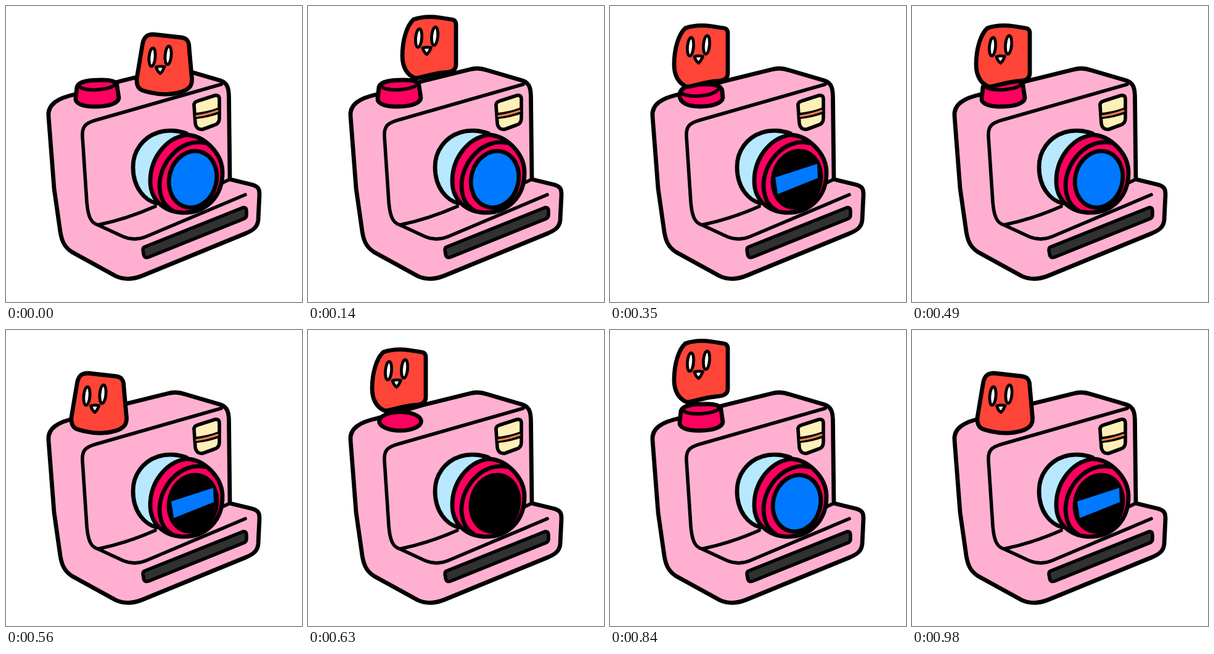
Recreate the animation shown at these times as an HTML page. Size 480 by 480 pixels, loop 1.05 s.

```html
<!DOCTYPE html>
<html lang="en">
<head>
<meta charset="utf-8">
<title>Bouncing on the shutter button</title>
<style>
html, body { margin: 0; width: 100%; height: 100%; overflow: hidden; background: #fff; }
svg { display: block; width: 100vw; height: 100vh; }
.ink { stroke: #000; stroke-width: 6.8; stroke-linecap: round; stroke-linejoin: round; fill: none; }
.pink { fill: #ffb0d0; }
.rose { fill: #ff0061; }
.red { fill: #ff4438; }
.sky { fill: #b8e8ff; }
.blue { fill: #0078ff; }
.cream { fill: #fff0b8; }
.dark { fill: #313131; }
.black { fill: #000; }
.thin { stroke-width: 5.6; }
.band { stroke-width: 10; stroke-linecap: butt; }
.stripe { stroke: #f0804f; stroke-width: 3; }

/* 15 poses of 70 ms each */
.hop, .crouch, .full, .half, .flat, .lids, .shut {
  animation: 1050ms step-end infinite;
}
.hop { animation-name: hopShow, hopMove; }
.crouch { animation-name: crouchShow, crouchMove; }
.full { animation-name: fullShow; }
.half { animation-name: halfShow; }
.flat { animation-name: flatShow; }
.lids { animation-name: lidsShow; }
.shut { animation-name: shutShow; }

@keyframes hopShow {
  0%, 20%, 53.33%, 93.33%, 100% { visibility: hidden; }
  6.66%, 26.66%, 60% { visibility: visible; }
}
@keyframes crouchShow {
  0%, 20%, 53.33%, 93.33%, 100% { visibility: visible; }
  6.66%, 26.66%, 60% { visibility: hidden; }
}
@keyframes hopMove {
  0%, 6.66% { transform: translate(96px, 0); }
  13.33% { transform: translate(49px, -14px); }
  20%, 46.66%, 86.66%, 100% { transform: none; }
  40%, 80% { transform: translate(0, -14px); }
}
@keyframes crouchMove {
  0% { transform: none; }
  6.66%, 100% { transform: translate(-106px, 24px); }
}
@keyframes fullShow {
  0%, 40%, 73.33% { visibility: visible; }
  20%, 53.33%, 93.33%, 100% { visibility: hidden; }
}
@keyframes halfShow {
  0%, 40%, 73.33%, 100% { visibility: hidden; }
  33.33%, 66.66% { visibility: visible; }
}
@keyframes flatShow {
  0%, 33.33%, 66.66%, 100% { visibility: hidden; }
  20%, 53.33%, 93.33% { visibility: visible; }
}
@keyframes lidsShow {
  0%, 26.66%, 40%, 60%, 73.33%, 100% { visibility: hidden; }
  20%, 33.33%, 53.33%, 66.66%, 93.33% { visibility: visible; }
}
@keyframes shutShow {
  0%, 33.33%, 66.66%, 100% { visibility: hidden; }
  26.66%, 60% { visibility: visible; }
}
</style>
</head>
<body>
<svg viewBox="0 0 480 480">
  <defs>
    <g id="face" stroke="#000" stroke-width="4.8" stroke-linejoin="round" fill="#fff">
      <ellipse cx="-13" cy="-20" rx="5" ry="15" transform="rotate(5 -13 -20)"/>
      <ellipse cx="13" cy="-23" rx="5" ry="15" transform="rotate(5 13 -23)"/>
      <path d="M-6.5 -4 Q0 -6 7 -4.5 Q4 3.5 0 6.5 Q-5 2.5 -6.5 -4Z"/>
    </g>
    <ellipse id="glass" cx="303" cy="281" rx="38.3" ry="46.3" transform="rotate(15 303 281)"/>
  </defs>

  <!-- body -->
  <g class="ink">
    <path class="pink" d="M69 179C67 159 85 149 113 143L185 122L262 103Q276 99 290 104L348 121C360 125 361.500 135 361.500 150L363 281L400 290C410 293 411 298 411 306L409 347C408 359 400 364 388 369L222 437C205 444 191 444 178 438L107 399C93 390 90 378 88 366L78 296Z"/>
    <path class="thin" d="M349 127L146 185C128 190 123 196 124 212L131 318C133 342 138 352 149 355L190 374C202 379 215 379 227 374L388 306M149 355Q194 346 242 325M363 281L346 289"/>
    <path class="thin dark" d="M224 391L384 327Q390 326 390 332L390 339Q390 343 386 345L232 407Q224 410 223 402L222 396Q222 392 224 391Z"/>
    <path class="thin cream" d="M305 162Q304 156 311 154L339 145Q346 144 346 151L346 182Q346 191 338 193L319 200Q309 201 307 191Z"/>
    <path class="band" d="M305 178.500Q326 177 347 169"/>
    <path class="stripe" d="M309 178.500Q327 176 343 170"/>
  </g>

  <!-- lens -->
  <g class="ink">
    <path class="sky" d="M293 207C280 202 262 200 247 205C222 213 206 235 206 261C206 295 225 315 244 320L290 300Z"/>
    <path class="rose" d="M293 209C257 214 233 250 234 286C235 315 256 333 284 335C325 337 352 308 351 268C350 239 322 210 293 209Z"/>
    <path d="M322 222C283 214 248 254 249 293C250 312 258 325 269 331"/>
    <use href="#glass" class="blue"/>
    <g class="lids">
      <use href="#glass" class="black"/>
      <path class="blue" stroke="none" d="M268 278L336 256L337 279L272 305Z"/>
    </g>
    <use href="#glass" class="black shut"/>
  </g>

  <!-- button -->
  <g class="ink">
    <g class="full">
      <path class="rose" d="M115 131C118 122 135 120 155 120C172 120 180 123 180 129L183 149C182 158 166 163 147 163C125 164 112 158 113 150Z"/>
      <path class="thin" d="M118 129C123 139 164 138 178 127"/>
    </g>
    <g class="half">
      <path class="rose" d="M113 145C113 133 126 127 149 127C170 126 181 129 182 138L183 149C181 158 165 163 147 163C126 163 113 157 113 145Z"/>
      <path class="thin" d="M117 142C130 149 164 147 175 136"/>
    </g>
    <ellipse class="rose flat" cx="149.500" cy="148" rx="34" ry="15.200"/>
  </g>

  <!-- jumper -->
  <g class="hop">
    <path class="ink red" d="M122 36C137 30.500 156 31.500 166 33L185 36Q191 37 191 44L191 109C191 119 183 121 171 122C150 124 138 130 125 131C111 126 104 112 104 95C104 70 111 46 122 36Z"/>
    <use href="#face" x="143.500" y="86"/>
  </g>
  <g class="crouch">
    <path class="ink red" d="M221 64C223 50 229 46 239 46L284 51C294 52 297 58 297 68L301 113C303 126 300 133 288 138C275 143 255 145 238 141C222 138 211 137 212 118Z"/>
    <use href="#face" x="250" y="103"/>
  </g>
</svg>
</body>
</html>
```
